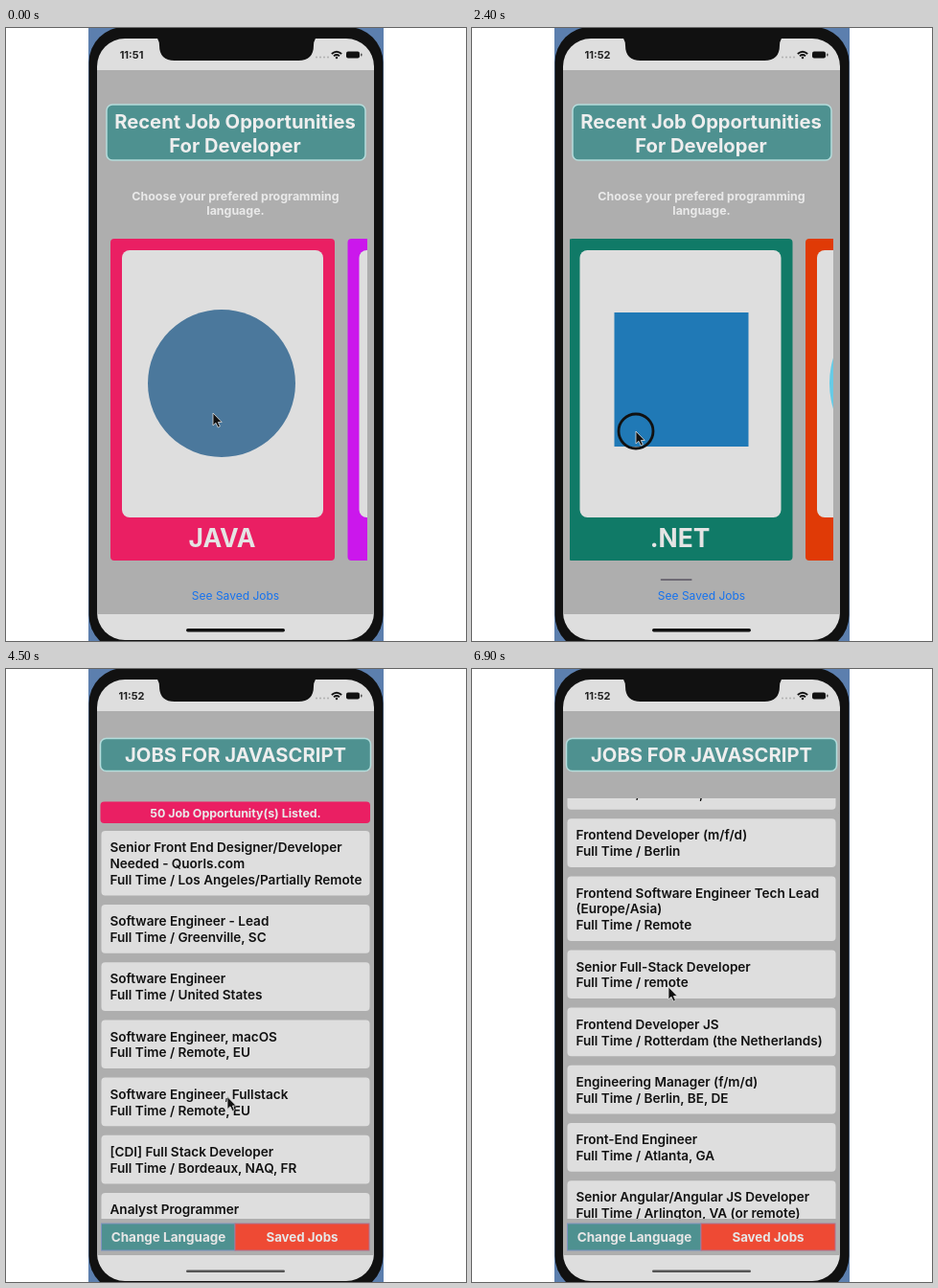
An HTML page for the animation above (7200 ms loop, 480 by 640 pixels).

```html
<!DOCTYPE html>
<html lang="en">
<head>
<meta charset="utf-8">
<title>Job browser</title>
<style>
  html, body { margin: 0; width: 100%; height: 100%; overflow: hidden; background: #fff; }
  svg { display: block; width: 480px; height: 640px; font-family: Inter, "Liberation Sans", sans-serif; }
</style>
</head>
<body>
<svg id="stage" viewBox="0 0 480 640"></svg>
<script>
const STEP = 300, LOOP = 7200;
const PAPER = '#dedede', TEAL = '#4e9190', PINK = '#ea1f63';

const rect = (x, y, w, h, fill, r = 0, extra = '') =>
  `<rect x="${x}" y="${y}" width="${w}" height="${h}" rx="${r}" fill="${fill}" ${extra}/>`;

// Text whose capitals are centred vertically on cy
const text = (str, x, cy, size, fill, weight = 700, anchor = 'middle', id = '') =>
  `<text ${id && `id="${id}"`} x="${x}" y="${cy + size * 0.364}" font-size="${size}" font-weight="${weight}"
    text-anchor="${anchor}" fill="${fill}">${str}</text>`;

const disc = (x, y, r, fill) => `<circle cx="${x}" cy="${y}" r="${r}" fill="${fill}"/>`;
const titleBox = (x, y, w, h) => rect(x, y, w, h, TEAL, 6, 'stroke="#b4dddc" stroke-width="1.5"');

// Language cards
const CARD_PITCH = 247.5;
const cards = [
  ['JAVA', PINK, disc(116, 371, 77, '#4b789c')],
  ['PYTHON', '#cb17ec', disc(117, 371, 64, '#2b5f92')],
  ['JAVASCRIPT', '#272b98', disc(115, 371, 92, '#449433')],
  ['.NET', '#107a67', rect(48, 297, 140, 140, '#2079b6')],
  ['', '#e03a06', disc(117, 371, 92, '#66cbe6')],
];
const cardMarkup = cards.map(([name, color, mark], i) => `
  <g transform="translate(${109 + i * CARD_PITCH})">
    ${rect(0, 220, 234, 336, color, 4)}
    ${rect(12, 232, 210, 279, PAPER, 8)}
    ${mark}
    ${text(name, 116.5, 532, 26.4, '#e4e4e4')}
  </g>`).join('');

// Job list: title lines, then place
const jobs = [
  ['Senior Front End Designer/Developer', 'Needed - Quorls.com', 'Los Angeles/Partially Remote'],
  ['Software Engineer - Lead', 'Greenville, SC'],
  ['Software Engineer', 'United States'],
  ['Software Engineer, macOS', 'Remote, EU'],
  ['Software Engineer, Fullstack', 'Remote, EU'],
  ['[CDI] Full Stack Developer', 'Bordeaux, NAQ, FR'],
  ['Analyst Programmer', 'Corvallis, OR'],
  ['Frontend Developer (m/f/d)', 'Berlin'],
  ['Frontend Software Engineer Tech Lead', '(Europe/Asia)', 'Remote'],
  ['Senior Full-Stack Developer', 'remote'],
  ['Frontend Developer JS', 'Rotterdam (the Netherlands)'],
  ['Engineering Manager (f/m/d)', 'Berlin, BE, DE'],
  ['Front-End Engineer', 'Atlanta, GA'],
  ['Senior Angular/Angular JS Developer', 'Arlington, VA (or remote)'],
];
const LINE = 16.8;
let nextJobY = 169;
const jobMarkup = jobs.map(lines => {
  const height = lines.length * LINE + 17.1, y = nextJobY;
  nextJobY += height + 9.5;
  return rect(99.5, y, 280, height, PAPER, 4) + lines.map((line, i) =>
    text(i === lines.length - 1 ? 'Full Time / ' + line : line,
      108.5, y + 17.3 + i * LINE, 13.55, '#111', 600, 'start')).join('');
}).join('');

const homeScreen = `
  ${titleBox(105, 80, 270, 58)}
  ${text('Recent Job Opportunities', 239, 97.5, 20.2, '#eee')}
  ${text('For Developer', 239, 122.5, 20.2, '#eee')}
  ${text('Choose your prefered programming', 239.5, 175, 12.4, '#e9e9e9')}
  ${text('language.', 239.5, 190, 12.4, '#e9e9e9')}
  <g clip-path="url(#cardClip)"><g id="cards">${cardMarkup}</g></g>
  ${rect(102, 575, 33, 2, '#6e6a74', 1, 'id="cardBar"')}
  ${text('See Saved Jobs', 239.5, 593, 12, '#1672ee', 400)}
  ${rect(188, 627, 103, 3.5, '#111', 1.7)}`;

const jobScreen = `
  ${titleBox(98.5, 72.5, 282, 34)}
  ${text('JOBS FOR JAVASCRIPT', 239.5, 90, 20.2, '#eee')}
  <g clip-path="url(#jobClip)"><g id="jobs">
    ${rect(98.5, 138.5, 281.5, 22.5, PINK, 4)}
    ${text('50 Job Opportunity(s) Listed.', 239.5, 150, 12.4, '#e9e9e9')}
    ${jobMarkup}
  </g></g>
  ${rect(379.5, 135, 2.5, 58, '#777', 1, 'id="jobBar"')}
  ${rect(99.5, 579, 139.5, 28, TEAL, 0, 'stroke="#7f93c0"')}
  ${rect(239, 579, 140, 28, '#ee4a34', 0, 'stroke="#b0708f"')}
  ${text('Change Language', 169.5, 593.5, 13.5, '#e6e6e6')}
  ${text('Saved Jobs', 309, 593.5, 13.3, '#e6e6e6')}
  ${rect(188, 627.5, 103, 2.5, '#555', 1.2)}`;

const statusBar = `
  <path d="M153 5 Q160 11 160 18 Q160 34 176 34 H305 Q321 34 321 18 Q321 11 328 5Z" fill="#111"/>
  ${text('', 131, 28, 11, '#222', 700, 'middle', 'clock')}
  ${[324, 328, 332, 336].map(x => disc(x, 30.5, 0.9, '#aaa')).join('')}
  <path d="M339.8 27 Q345 22.5 350.2 27 M342 29.3 Q345 26.8 348 29.3" fill="none" stroke="#111" stroke-width="1.8"/>
  ${disc(345, 31, 1.2, '#111')}
  ${rect(355, 24.5, 14, 7, '#111', 2)}${rect(370, 26.5, 1.5, 3, '#555', 0.7)}`;

document.getElementById('stage').innerHTML = `
  <defs>
    <clipPath id="cardClip">${rect(102, 215, 275, 345, '#000')}</clipPath>
    <clipPath id="jobClip">${rect(95, 135, 289, 439, '#000')}</clipPath>
    <clipPath id="screenClip">${rect(95, 11, 289, 628, '#000', 29)}</clipPath>
  </defs>
  ${rect(86, 0, 308, 640, '#5c7fae')}
  ${rect(86.5, -1, 307, 651, '#111', 37)}
  <g clip-path="url(#screenClip)">
    ${rect(95, 11, 289, 629, PAPER)}
    ${rect(95, 44, 289, 568, '#aeaeae')}
    <g id="home">${homeScreen}</g>
    <g id="list">${jobScreen}</g>
  </g>
  ${statusBar}
  <g id="pointer">
    <circle id="ring" r="18" fill="none" stroke="#111" stroke-width="2.8"/>
    <path d="M0 0V13L3 10.3L5.2 15L7.4 14L5.3 9.5H9.2Z" fill="#111" stroke="#ddd" stroke-width=".8"/>
  </g>`;

// Keys are [step, value]; steps are 300 ms long
const pointerX = [[0, 216], [1, 275], [2, 130], [3, 285], [4, 280], [5, 150], [6, 230], [7, 270],
  [8, 171], [9, 171], [10, 230], [11, 150], [12, 193], [14, 231], [15, 231], [19, 238], [23, 205]];
const pointerY = [[0, 402], [3, 400], [8, 421], [9, 421], [12, 400], [14, 446], [16, 447], [19, 304], [23, 332]];
const cardScroll = [[1, 0], [2, 150], [3, 245], [4, 248], [5, 385], [6, 495], [7, 640],
  [8, 751], [9, 745], [10, 640], [11, 480], [12, 423], [13, 400]];
const jobScroll = [[16, 0], [19, 305], [22, 451]];
const pressedSteps = [1, 2, 4, 5, 7, 8, 10, 12, 13, 17, 18, 20];

function valueAt(keys, step) {
  if (step <= keys[0][0]) return keys[0][1];
  const next = keys.findIndex(([s]) => s > step);
  if (next < 0) return keys[keys.length - 1][1];
  const [s0, v0] = keys[next - 1], [s1, v1] = keys[next];
  return v0 + (v1 - v0) * (step - s0) / (s1 - s0);
}

const el = id => document.getElementById(id);
const show = (id, on) => el(id).setAttribute('visibility', on ? 'inherit' : 'hidden');
const move = (id, x, y) => el(id).setAttribute('transform', `translate(${x} ${y})`);

function draw(step) {
  const onList = step >= 14;
  const cardX = valueAt(cardScroll, step), jobY = valueAt(jobScroll, step);
  show('home', !onList);
  show('list', onList);
  move('cards', -cardX, 0);
  move('cardBar', cardX * 0.126, 0);
  el('cardBar').setAttribute('opacity', step > 1 ? 1 : 0);
  move('jobs', 0, -jobY);
  move('jobBar', 0, jobY * 0.14);
  el('jobBar').setAttribute('opacity', step > 16 && step < 23 ? 1 : 0);
  move('pointer', valueAt(pointerX, step), valueAt(pointerY, step));
  show('ring', pressedSteps.includes(step));
  el('clock').textContent = step < 2 ? '11:51' : '11:52';
}

function tick() {
  draw(Math.floor(performance.now() % LOOP / STEP));
  requestAnimationFrame(tick);
}
tick();
</script>
</body>
</html>
```
